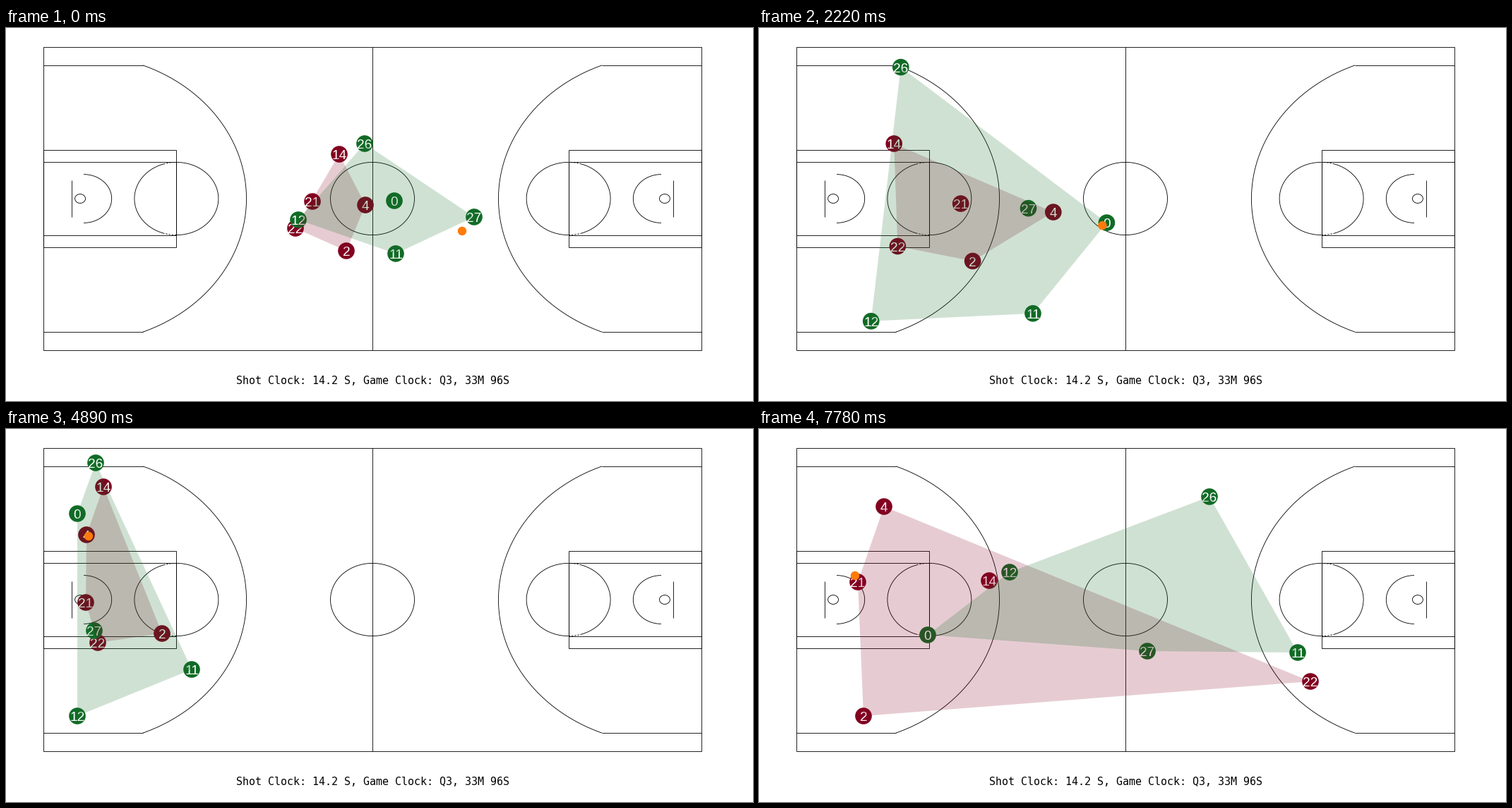
Recreate the animation shown at these times as a matplotlib script. Size 1058 by 529 pixels, loop 8000 ms.

```python
import numpy as np
import matplotlib.pyplot as plt
from matplotlib.animation import FuncAnimation
from matplotlib.patches import Circle, Polygon, Rectangle

W, H, DPI = 1058, 529, 100
LOOP_MS, TICK_MS, POSES = 8000, 40, 36
PX = 72 / DPI                      # one pixel in points

GREEN, MAROON, ORANGE = "#116b26", "#820020", "#ff7b08"

fig = plt.figure(figsize=(W / DPI, H / DPI), dpi=DPI, facecolor="white")
ax = fig.add_axes([0, 0, 1, 1])
ax.set_xlim(0, W)
ax.set_ylim(H, 0)
ax.axis("off")


# ---- court, measured in feet on a 94 x 50 floor ----
LEFT, TOP, RIGHT, BOTTOM = 53, 27, 985, 457
FX, FY = (RIGHT - LEFT) / 94, (BOTTOM - TOP) / 50
MID_X, MID_Y = (LEFT + RIGHT) / 2, (TOP + BOTTOM) / 2
PEN_WIDTH = 0.85 * PX


def draw(xs, ys, style="-"):
    ax.plot(xs, ys, style and "k", ls=style, lw=PEN_WIDTH, zorder=1,
            solid_capstyle="butt")


def box(x0, y0, x1, y1):
    ax.add_patch(Rectangle((x0, y0), x1 - x0, y1 - y0, fill=False,
                           ec="black", lw=PEN_WIDTH, zorder=1))


def arc(x, feet, start=0, end=360, side=1, style="-"):
    a = np.radians(np.linspace(start, end, 181))
    draw(x + side * feet * FX * np.cos(a), MID_Y + feet * FY * np.sin(a),
         style)


def half_court(base, side):
    def at(feet):
        return base + side * feet * FX

    # Three point line
    corner = np.arcsin(22 / 23.75)
    bend = at(5.25 + 23.75 * np.cos(corner))
    for y in (MID_Y - 22 * FY, MID_Y + 22 * FY):
        draw([base, bend], [y, y])
    arc(at(5.25), 23.75, -np.degrees(corner), np.degrees(corner), side)

    # Key and free throw circle, dashed where it enters the key
    for half in (8, 6):
        box(base, MID_Y - half * FY, at(19), MID_Y + half * FY)
    arc(at(19), 6, -90, 90, side)
    arc(at(19), 6, 108, 252, side)
    for start in (90, 252):
        arc(at(19), 6, start, start + 18, side, (0, (3, 2)))

    # Basket
    draw([at(4)] * 2, [MID_Y - 3 * FY, MID_Y + 3 * FY])
    arc(at(5.25), 0.75)
    arc(at(5.75), 4, -90, 90, side)


box(LEFT, TOP, RIGHT, BOTTOM)
draw([MID_X, MID_X], [TOP, BOTTOM])
arc(MID_X, 6)
half_court(LEFT, 1)
half_court(RIGHT, -1)

ax.text(MID_X, 505, "Shot Clock: 14.2 S, Game Clock: Q3, 33M 96S",
        family="DejaVu Sans Mono", size=15 * PX, color="black",
        ha="center", va="baseline")


# ---- motion ----
def run(points):
    """Smooth curve through {step: (x, y)}, standing still outside it."""
    steps = np.array(list(points), float)
    pos = np.array(list(points.values()), float)
    speed = np.gradient(pos, steps, axis=0)

    def place(step):
        step = np.clip(step, steps[0], steps[-1])
        i = min(np.searchsorted(steps, step, "right"), len(steps) - 1) - 1
        h = steps[i + 1] - steps[i]
        u = (step - steps[i]) / h
        v = 1 - u
        return (v * v * ((1 + 2 * u) * pos[i] + u * h * speed[i])
                + u * u * ((1 + 2 * v) * pos[i + 1] - v * h * speed[i + 1]))

    return place


maroon_runs = {
    14: run({0: (472, 179), 6: (232, 146), 14: (189, 177), 22: (138, 82),
             26: (214, 145), 35: (326, 215)}),
    21: run({0: (434, 246), 6: (323, 241), 14: (251, 257), 22: (113, 246),
             26: (136, 276), 30: (140, 217)}),
    4: run({6: (509, 251), 14: (322, 257), 22: (114, 150), 26: (145, 171),
            30: (155, 154), 35: (177, 110)}),
    22: run({0: (410, 284), 6: (251, 309), 14: (166, 305), 22: (130, 303),
             26: (251, 370), 30: (509, 372), 35: (781, 358)}),
    2: run({0: (482, 316), 6: (360, 328), 22: (221, 290), 26: (210, 248),
            30: (125, 314), 35: (148, 407)}),
}
green_runs = {
    26: run({0: (508, 164), 6: (257, 76), 14: (184, 51), 22: (127, 48),
             26: (166, 41), 30: (360, 59), 35: (638, 96)}),
    27: run({0: (663, 268), 6: (507, 298), 14: (264, 215), 22: (125, 286),
             26: (171, 306), 30: (307, 309), 35: (550, 315)}),
    11: run({0: (552, 320), 6: (498, 370), 14: (282, 421), 22: (263, 341),
             26: (292, 242), 30: (492, 261), 35: (763, 317)}),
    12: run({0: (414, 272), 6: (244, 369), 14: (103, 441), 22: (101, 407),
             26: (104, 235), 30: (177, 190), 35: (355, 203)}),
    0: run({0: (550, 245), 6: (630, 257), 14: (308, 274), 22: (101, 120),
            26: (170, 171), 30: (161, 246), 35: (239, 292)}),
}

# Ball handlers in turn: run, hand offset, first and last step of the catch
handlers = [
    (green_runs[27], (-17, 20), -1, 0),
    (green_runs[0], (-6, 4), 0, 5),
    (maroon_runs[4], (3, 2), 19, 22),
    (maroon_runs[21], (-4, -9), 25, 28),
]


def ball_place(step):
    spot = np.zeros(2)
    for place, hand, start, end in handlers:
        u = np.clip((step - start) / (end - start), 0, 1)
        u = u * u * (3 - 2 * u)
        spot = (1 - u) * spot + u * (place(step) + hand)
    return spot


def hull(points):
    """Convex hull by monotone chain."""
    pts = sorted(map(tuple, points))

    def chain(seq):
        out = []
        for x, y in seq:
            while len(out) > 1:
                (x0, y0), (x1, y1) = out[-2:]
                if (x1 - x0) * (y - y0) > (y1 - y0) * (x - x0):
                    break
                out.pop()
            out.append((x, y))
        return out[:-1]

    return chain(pts) + chain(pts[::-1])


# ---- moving parts ----
class Team:
    def __init__(self, runs, color, layer):
        self.players = []
        for z, (number, place) in enumerate(runs.items(), layer):
            disc = ax.add_patch(Circle((0, 0), 11.8, fc=color, lw=0, zorder=z))
            label = ax.text(0, 0, str(number), color="white", zorder=z + 0.5,
                            family="Liberation Sans", size=19 * PX,
                            ha="center", va="baseline")
            self.players.append((place, disc, label))
        self.area = ax.add_patch(Polygon([(0, 0)] * 3, fc=color, alpha=0.2,
                                         lw=0, zorder=layer + 30))

    def move(self, step):
        spots = []
        for place, disc, label in self.players:
            x, y = place(step)
            disc.center = x, y
            label.set_position((x, y + 7))
            spots.append((x, y))
        self.area.set_xy(hull(spots))


teams = [Team(maroon_runs, MAROON, 10), Team(green_runs, GREEN, 20)]
ball = ax.add_patch(Circle((0, 0), 6.2, fc=ORANGE, lw=0, zorder=60))


def update(tick):
    # Poses are held, so the motion advances in 36 hard steps
    step = int((tick * TICK_MS + 35) * POSES / LOOP_MS)
    step = min(step, POSES - 1)
    for team in teams:
        team.move(step)
    ball.center = tuple(ball_place(step))
    return []


update(0)
anim = FuncAnimation(fig, update, frames=LOOP_MS // TICK_MS,
                     interval=TICK_MS, repeat=True, blit=False)
plt.show()
```
